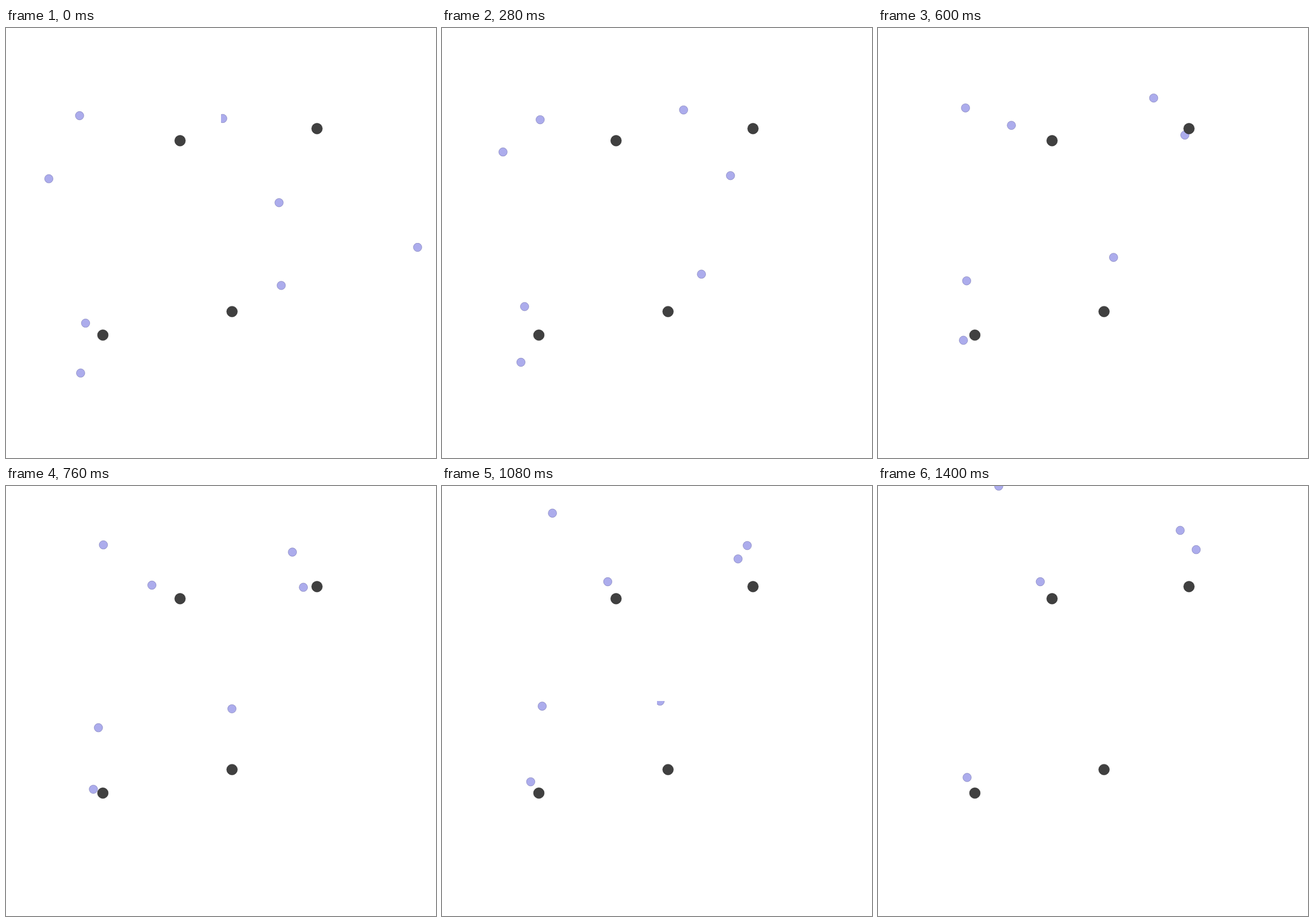
Animation of 748 by 748 pixels, one loop 1440 ms. Source, as an HTML page with a canvas:

```html
<!DOCTYPE html>
<html lang="en">
<head>
<meta charset="utf-8">
<title>Particle agents</title>
<style>
  html, body { margin: 0; height: 100%; overflow: hidden; background: #fff; }
  canvas { display: block; width: 748px; height: 748px; }
</style>
</head>
<body>
<canvas id="stage" width="748" height="748"></canvas>
<script>
const ctx = document.getElementById('stage').getContext('2d');
const STEP = 40, STEPS = 36, KEEP = 0.75, HALF = 374;

// A damped body starts at rest. Each leg [tick, x, y] is flown under the one
// constant push that reaches its goal; the last push lasts to the loop's end.
function travel(x, y, ...legs) {
  const path = [[x, y]];
  let vx = 0, vy = 0, fx = 0, fy = 0;
  for (let tick = 0; tick < STEPS - 1; tick++) {
    const start = path.length === 1 || legs[0]?.[0] === tick;
    if (start && tick > 0) legs.shift();
    if (start && legs.length) {
      const [goal, goalX, goalY] = legs[0];
      const n = goal - tick, coast = KEEP * (1 - KEEP ** n) / (1 - KEEP);
      const push = (gap, v) => (gap - v * coast) * (1 - KEEP) / (n - coast);
      fx = push(goalX - x, vx);
      fy = push(goalY - y, vy);
    }
    x += vx = vx * KEEP + fx;
    y += vy = vy * KEEP + fy;
    path.push([x, y]);
  }
  return path;
}

// Four separate worlds, one per quadrant.
const worlds = [
  { left: 0, top: 0, mark: [302.8, 196], agents: [
    travel(128, 152.5, [10, 197.7, 164], [19, 253.8, 172.5], [27, 288.3, 166.5], [35, 282.3, 166.5]),
    travel(74.5, 262.2, [10, 126, 186.4], [19, 169.4, 102.4], [35, 210, 0.2])
  ] },
  { left: HALF, top: 0, mark: [541, 175], agents: [
    travel(377, 157.4, [10, 447.4, 133.2], [19, 498.2, 115], [27, 531, 103.6], [35, 553.5, 110.7]),
    travel(475, 303.8, [10, 518.7, 227.2], [15, 533.8, 186.3], [19, 517.3, 176.2], [27, 515, 126.8], [35, 525.7, 77.2])
  ] },
  { left: 0, top: HALF, mark: [168.5, 534.2], agents: [
    travel(138.4, 513.4, [10, 147, 466.5], [27, 174.3, 383]),
    travel(129.8, 600.2, [10, 142, 569.7], [15, 148.6, 543.2], [19, 152, 527.6], [35, 155, 507])
  ] },
  { left: HALF, top: HALF, mark: [393.2, 493.3], agents: [
    travel(716, 381.5, [4, 704.5, 371.5]),
    travel(478.8, 447.8, [10, 434, 415.9], [19, 393, 387.6], [27, 379.3, 374.2])
  ] }
];

function disc([x, y], radius, fill, line) {
  ctx.beginPath();
  ctx.arc(x, y, radius, 0, 2 * Math.PI);
  ctx.fillStyle = fill;
  ctx.fill();
  ctx.strokeStyle = line;
  ctx.stroke();
}

function draw() {
  const tick = Math.floor(performance.now() / STEP) % STEPS;
  ctx.clearRect(0, 0, 748, 748);
  for (const { left, top, mark, agents } of worlds) {
    ctx.save();
    ctx.beginPath();
    ctx.rect(left, top, HALF, HALF);
    ctx.clip();
    for (const path of agents) disc(path[tick], 7.4, '#acacec', 'rgba(60,60,130,.35)');
    disc(mark, 9.4, '#404040', 'rgba(32,32,32,.5)');
    ctx.restore();
  }
  requestAnimationFrame(draw);
}
draw();
</script>
</body>
</html>
```
